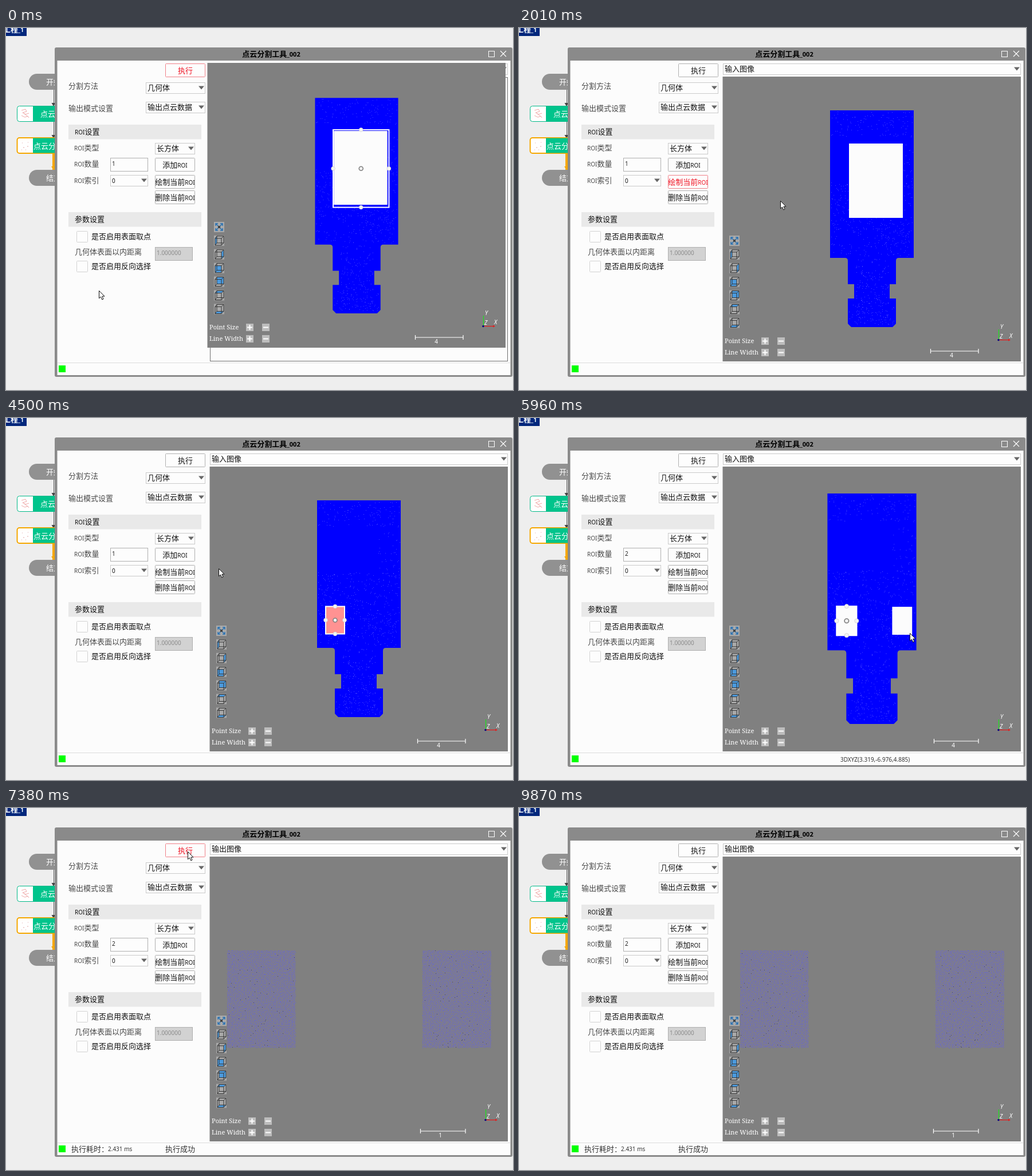
Write an HTML page that moves like this. It is 885 px wide and 633 px high and loops after 9.89 s.

```html
<!DOCTYPE html>
<html lang="zh-CN">
<head>
<meta charset="utf-8">
<style>
html,body{margin:0;width:100%;height:100%;overflow:hidden;background:#eee}
svg{display:block;width:885px;height:633px}
text{font-family:"Noto Sans","Noto Sans CJK SC","Noto Sans CJK",sans-serif;white-space:pre}
.serif{font-family:"Noto Serif",serif}
</style>
</head>
<body>
<svg id="stage" viewBox="0 0 885 633" xmlns="http://www.w3.org/2000/svg"></svg>
<script>
const LOOP = 9890;
const BLUE = '#0000ff', GRAY = '#808080', RED = '#f01020', EDGE = '#b0b0b0';

let seed = 7;
const rnd = () => (seed = (seed * 16807) % 2147483647) / 2147483647;

// markup helpers
const box = (x, y, w, h, fill, stroke = 'none', extra = '') =>
  `<rect x="${x}" y="${y}" width="${w}" height="${h}" fill="${fill}" stroke="${stroke}" ${extra}/>`;
const frame = (x, y, w, h, fill, stroke, extra = '') =>
  box(x + .5, y + .5, w - 1, h - 1, fill, stroke, extra);
const path = (d, fill = 'none', stroke = 'none', w = 1, extra = '') =>
  `<path d="${d}" fill="${fill}" stroke="${stroke}" stroke-width="${w}" ${extra}/>`;
const dot = (x, y, r, fill, stroke = 'none', w = 1) =>
  `<circle cx="${x}" cy="${y}" r="${r}" fill="${fill}" stroke="${stroke}" stroke-width="${w}"/>`;
// Latin runs are set smaller than the Chinese glyphs; cy is the middle of the line
const mixed = (s, latin = 10) =>
  s.replace(/[\x21-\x7e][\x20-\x7e]*/g, m => `<tspan font-size="${latin}">${m}</tspan>`);
const label = (s, x, cy, fill = '#111', extra = '', latin = 10) =>
  `<text x="${x}" y="${cy + 4}" font-size="13" fill="${fill}" ${extra}>${mixed(s, latin)}</text>`;
const small = (s, x, y, fill, extra = '') =>
  `<text x="${x}" y="${y}" font-size="10" fill="${fill}" ${extra}>${s}</text>`;
const arrow = (x, y) => path(`M${x} ${y}h10l-5 6z`, '#666');
const combo = (x, y, w, h, s, extra) =>
  frame(x, y, w, h, '#fdfdfd', '#cacaca') + label(s, x + 3, y + h / 2, '#111', extra) +
  arrow(x + w - 12, y + h / 2 - 3.5);
const button = (id, s, y, x = 260) =>
  `<g id="${id}">${frame(x, y, 70, 24, '#fdfdfd', EDGE, 'rx="1"')}` +
  label(s, x + 35, y + 12.5, '#111', 'text-anchor="middle"') + '</g>';

function flow() {
  const pill = (y, s) => box(40, y, 90, 28, '#919191', 'none', 'rx="14"') + label(s, 70, y + 15, '#fff');
  const node = (y, s, x, edge, w) =>
    box(19.5, y + .5, 110, 27, '#fff', edge, `rx="4" stroke-width="${w}"`) +
    box(47, y + 1, 60, 26, '#00c48c') + label(s, x, y + 15, '#fff');
  const head = y => path(`M79.5 ${y - 5}h7l-3.5 6z`, '#444');
  return box(0, 0, 36, 14, '#00277c') + label('工程_1', -5, 3, '#fff', 'font-weight="700"') +
    path('M83.5 108V136M83.5 163V192', 'none', '#555') + head(136) + head(192) +
    pill(80, '开始') + node(136, '点云输入', 60, '#00b887', 1) +
    path('M27 144l7-2 2 4-7 2 5 3 6-2M27 153l6 3 5-2 2 3M31 149l7 6', 'none', '#eda0a0', .9) +
    node(191.5, '点云分割', 48, '#f5a700', 2) +
    path('M28 201h1M38 200h1M30 209h2M37 207h2M27 213h1M34 213h1', 'none', '#e0a0a0') +
    box(81, 220, 4, 28, '#f5a700') + path('M79 242h8l-4 6z', '#f5a700') +
    pill(248, '结束');
}

function panel() {
  const check = (y, s) => frame(123, y, 20, 20, '#fdfdfd', '#d2d2d2', 'rx="1"') + label(s, 149, y + 9.5);
  const head = (y, s) => box(109, y, 232, 25.5, '#e9e9e9') + label(s, 120, y + 13.3);
  const gray = (s, x, y) => label(s, x, y, '#484848');
  return box(85, 34, 799, 576, '#8a8a8a', 'none', 'rx="3"') + box(89.5, 57, 791, 550, '#fcfcfc') +
    label('点云分割工具_002', 463, 46, '#000', 'text-anchor="middle" font-weight="700"', 11) +
    frame(842, 40, 11, 11, 'none', '#fff') + path('M863 40l10 10M873 40l-10 10', 'none', '#fff', 1.1) +
    button('exec', '执行', 62, 278) +
    gray('分割方法', 109, 102) + combo(244, 95, 104, 20, '几何体') +
    gray('输出模式设置', 109, 141) + combo(244, 129, 104, 20, '输出点云数据') +
    head(169, 'ROI设置') +
    gray('ROI类型', 119, 210) + combo(260, 201, 70, 20, '长方体') +
    gray('ROI数量', 119, 237.5) + frame(182, 227, 66, 24, '#fdfdfd', EDGE) +
    small('1', 185, 240.5, '#222', 'id="count"') +
    gray('ROI索引', 119, 267) + combo(182, 257, 66, 20, '') + small('0', 185, 271, '#111') +
    button('add', '添加ROI', 227) + button('draw', '绘制当前ROI', 257) + button('del', '删除当前ROI', 284) +
    head(322, '参数设置') + check(355, '是否启用表面取点') +
    gray('几何体表面以内距离', 120, 392) + frame(260, 383, 66, 24, '#d2d2d2', EDGE) +
    small('1.000000', 263, 397, '#8a8a8a') +
    check(407, '是否启用反向选择') +
    path('M90 585.5H880', 'none', '#dcdcdc') + box(92, 590, 12, 12, '#00ff00') +
    `<g id="done">${label('执行耗时：', 114, 596.5, '#333')}${small('2.431 ms', 178, 600, '#333')}` +
    `${label('执行成功', 278, 596.5, '#333')}</g>` + small('', 561, 600.5, '#333', 'id="coords"') +
    combo(356, 62, 520, 20, '输入图像', 'id="source"') + frame(356, 86, 520, 497, '#fcfcfc', '#707070');
}

function tools() {
  const faces = ['M2 5l3-4v12l-3 4z', 'M13 5l4-4v12l-4 4z', 'M2 5h11v12h-11z', 'M5 1h12v12h-12z',
    'M2 5l3-4h12l-4 4z', 'M2 17l3-4h12l-4 4z'];
  const tile = (i, art) => `<g transform="translate(367 ${363 + i * 23.9})">${box(0, 0, 18, 18, '#aaa')}${art}</g>`;
  const fit = path('M3 7V3H7M11 3h4v4M15 11v4h-4M7 15H3v-4M3 3l12 12M15 3L3 15', 'none', '#2872b4', 1.5) +
    box(7, 7, 4, 4, '#444');
  const wire = path('M2 5h11v12h-11zM5 1h12v12h-12zM2 5l3-4M13 5l4-4M2 17l3-4M13 17l4-4', 'none', '#333', 1);
  return tile(0, fit) + faces.map((d, i) => tile(i + 1, path(d, '#4b9be0') + wire)).join('');
}

function sizer(s, y) {
  return `<text class="serif" x="359" y="${y + 4}" font-size="11" fill="#fff">${s}</text>` +
    box(423, y - 6, 13, 13, '#bdbdbd') + box(451, y - 6, 13, 13, '#bdbdbd') +
    path(`M425 ${y + .5}h9M429.5 ${y - 4}v9M453 ${y + .5}h9`, 'none', '#fff', 2);
}

function part() {
  let d = '';
  const spray = (n, x, y, w, h) => {
    while (n--) d += `M${(x + rnd() * w) | 0} ${((y + rnd() * h) | 0) + .5}h1`;
  };
  spray(120, 545, 146, 142, 45);
  spray(400, 545, 270, 142, 130);
  spray(35, 650, 200, 38, 70);
  spray(180, 588, 404, 58, 115);
  spray(50, 576, 475, 80, 44);
  return path('M543 144H689V402H663Q658 402 658 407V448H647V473H658V517L652 523H580L574 517V473H585V448H574V407Q574 402 569 402H543Z', BLUE) +
    path(d, 'none', '#5656ff', 1, 'opacity=".8"');
}

// editable region: outline, four side handles and a centre ring
function region(id, x, y, w, h, inner) {
  const cx = x + w / 2, cy = y + h / 2;
  return `<g id="${id}">${inner}${box(x, y, w, h, 'none', '#fff', 'stroke-width="2"')}` +
    [[cx, y], [cx, y + h], [x, cy], [x + w, cy]].map(p => dot(...p, 3.4, '#f4f4f4', '#ccc', .7)).join('') +
    dot(cx, cy, 3.5, '#f2f2f2', '#808080', 1.6) + '</g>';
}

function cloud(x, y, w, h) {
  let a = '', b = '';
  for (let j = 0; j < h; j += 3)
    for (let i = 0; i < w; i += 3) {
      const p = `M${x + i + (rnd() * 2.6 | 0)} ${y + j + (rnd() * 2.6 | 0) + .5}h1`;
      if (rnd() < .03) b += p; else a += p;
    }
  return box(x, y, w, h, '#7c7a92') + path(a, 'none', '#6262dc') + path(b, 'none', '#3c3c78');
}

function viewer() {
  const axis = (s, x, y) => small(s, x, y, '#fff', 'font-style="italic"');
  return '<g id="view">' + box(355.5, 85, 520.5, 498, GRAY) +
    '<g id="model">' + part() +
    `<g id="big">${box(576, 202, 94, 130, '#fcfcfc')}</g>` +
    region('edit', 574.8, 200, 98, 136.5, '') +
    region('roi', 558, 329.5, 33, 48, box(558, 329.5, 33, 48, '#ff9292', 'none', 'id="fill"')) +
    box(649.3, 330.4, 32.8, 46, '#fcfcfc', 'none', 'id="second"') + '</g>' +
    `<g id="out">${cloud(386, 249, 119, 170)}${cloud(727, 249, 120, 170)}</g>` +
    tools() + sizer('Point Size', 547) + sizer('Line Width', 567) +
    path('M837.5 545V527', 'none', '#20e020', 1.3) + path('M837 545.5H857', 'none', '#e02020', 1.3) +
    path('M854 543.5l4 2-4 2z', '#e02020') + dot(837, 545.5, 1.7, '#000080') +
    axis('Y', 840, 526) + axis('Z', 839, 543) + axis('X', 856, 542) +
    path('', 'none', '#fff', 1.2, 'id="bar"') +
    small('4', 755, 575.5, '#fff', 'id="unit" text-anchor="middle"') + '</g>';
}

document.getElementById('stage').innerHTML = box(0, 0, 885, 633, '#eee') + flow() + panel() + viewer() +
  path('M0 0V13.2L3 10.5L5.2 15.4L7.5 14.4L5.4 9.6H9.5Z', '#fff', '#111', 1, 'id="cursor"');

const el = {};
document.querySelectorAll('[id]').forEach(n => el[n.id] = n);
const show = (n, on) => n.setAttribute('visibility', on ? 'inherit' : 'hidden');
const paint = (n, on) => {
  n.firstChild.setAttribute('stroke', on ? '#f08088' : EDGE);
  n.lastChild.setAttribute('fill', on ? RED : '#111');
};

// pointer moves: first step, last step, number of steps, end point
const moves = [
  [580, 1010, 4, 300, 264], [1730, 2010, 3, 456, 302], [2160, 2740, 5, 557, 329],
  [3020, 3600, 5, 591, 376], [4350, 4500, 2, 371, 263], [4640, 4640, 1, 315, 240],
  [4790, 5080, 3, 649, 330], [5230, 5230, 1, 682, 376], [6530, 7220, 6, 317, 76],
  [7960, 8410, 4, 519, 334], [8540, 8970, 4, 710, 597]
];
function pointer(t) {
  let x = 162, y = 459;
  for (const [a, b, n, ex, ey] of moves) {
    if (t < a) break;
    const gap = n > 1 ? (b - a) / (n - 1) : 1;
    const k = Math.min(n, Math.floor((t - a) / gap + 1e-6) + 1) / n;
    x += (ex - x) * k;
    y += (ey - y) * k;
  }
  return [x, y];
}

function render(t) {
  const within = (a, b) => t >= a && t < b;
  const early = t < 1730, two = t >= 5960, out = t >= 7380;
  const [x, y] = pointer(t);

  el.cursor.setAttribute('transform', `translate(${Math.round(x) + .5} ${Math.round(y) + .5})`);
  show(el.cursor, t < 9120);
  paint(el.exec, early || within(7220, 9870));
  paint(el.draw, within(1010, 3020));
  paint(el.add, within(4640, 5080));
  el.count.textContent = two ? 2 : 1;
  el.source.textContent = out ? '输出图像' : '输入图像';
  show(el.done, out);

  show(el.coords, within(2740, 3900) || within(5080, 6530));
  const wx = (x - 591) / 20.75 - 1.067, wy = (376 - y) / 20.75 - 6.976;
  el.coords.textContent = `3DXYZ(${wx.toFixed(3)},${wy.toFixed(3)},4.885)`;

  el.view.setAttribute('transform', early ? 'translate(-4 -24)' : '');
  el.model.setAttribute('transform',
    early ? 'translate(616 523) scale(.994) translate(-616 -523)' :
    two ? 'translate(616 132) scale(1.063) translate(-616 -144)' : '');
  show(el.model, !out);
  show(el.big, t < 3900);
  show(el.edit, early);
  show(el.roi, t >= 3900 && !out);
  el.fill.setAttribute('fill', two ? '#fcfcfc' : '#ff9292');
  show(el.second, two && !out);
  show(el.out, out);

  const left = out ? 723.5 : two ? 724.5 : 718.5;
  el.bar.setAttribute('d', `M${left} 561V569M${left} 565H802M802 561V569`);
  el.unit.textContent = out ? 1 : 4;
  el.unit.setAttribute('x', two ? 758 : 755);
}

const start = performance.now();
function tick() {
  render((performance.now() - start) % LOOP);
  requestAnimationFrame(tick);
}
tick();
</script>
</body>
</html>
```
